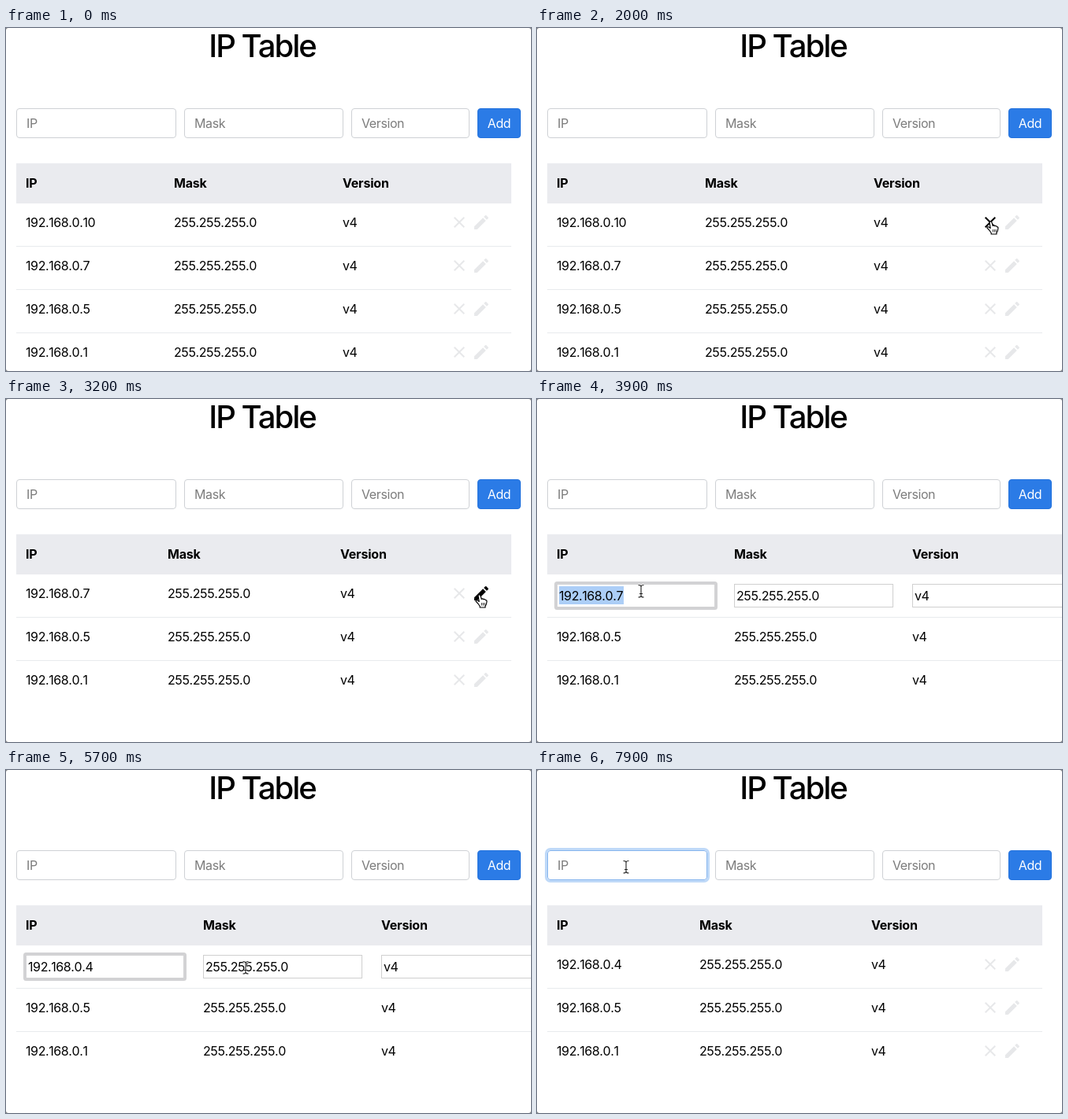
Animation, 666 px wide and 436 px high, one loop 8 s. Source, as an HTML page:

```html
<!DOCTYPE html>
<html lang="en">
<head>
<meta charset="utf-8">
<title>IP Table</title>
<style>
  html, body { margin: 0; width: 100%; height: 100%; overflow: hidden; background: #777; }
  svg { display: block; width: 666px; height: 436px; }
  text {
    font: 400 16px Inter, Roboto, sans-serif;
    font-optical-sizing: none;
    font-kerning: none;
    letter-spacing: -0.4px;
    fill: #000;
  }
  .title { font-size: 40px; font-weight: 500; font-kerning: normal; letter-spacing: -2px; text-anchor: middle; }
  .head { font-weight: 700; font-kerning: normal; letter-spacing: -0.2px; }
  .hint { fill: #7c7c7c; font-kerning: normal; }
  .add { fill: #fff; text-anchor: middle; }
</style>
</head>
<body>
<svg id="stage" viewBox="0 0 666 436" xmlns="http://www.w3.org/2000/svg"></svg>
<script>
const NS = 'http://www.w3.org/2000/svg';
const LOOP = 8000, STEP = 100;
const REMOVE = 2200, EDIT = 3300, FOCUS = 3700, SELECT = 3800;
const DESELECT = 4500, ERASE = 4800, TYPE = 5100, SAVE = 6100, FORM_FOCUS = 7000;
const PALE = '#e7e8ea', LINE = '#e8eaed';

const ICONS = {
  close: 'M19 6.41 17.59 5 12 10.59 6.41 5 5 6.41 10.59 12 5 17.59 6.41 19 12 13.41 17.59 19 19 17.59 13.41 12z',
  pencil: 'M3 17.25V21h3.75L17.81 9.94l-3.75-3.75zM20.71 7.04a1 1 0 0 0 0-1.41l-2.34-2.34a1 1 0 0 0-1.41 0l-1.83 1.83 3.75 3.75z'
};

// Pointer waypoints: time, x, y
const PATH = [
  [0, 622, 475], [300, 612, 446], [900, 577, 246], [2500, 577, 246],
  [2800, 598, 248], [3200, 602, 249], [3300, 602, 249], [3700, 132, 244],
  [5400, 132, 244], [5700, 304, 251], [6000, 304, 251], [6500, 138, 147],
  [7000, 113, 123], [8000, 113, 123]
];

const stage = document.getElementById('stage');

function add(parent, tag, attrs, content) {
  const node = document.createElementNS(NS, tag);
  for (const key in attrs) node.setAttribute(key, attrs[key]);
  if (content !== undefined) node.textContent = content;
  return parent.appendChild(node);
}
const group = parent => add(parent, 'g', {});
const text = (parent, x, y, content, cls = '') => add(parent, 'text', { x, y, class: cls }, content);
const rect = (parent, x, y, width, height, attrs) => add(parent, 'rect', { x, y, width, height, ...attrs });
const hline = (parent, y, width) => rect(parent, 13, y, width, 1, { fill: LINE });
const box = (parent, x, y, width, height, rx, stroke, fill = '#fff') =>
  rect(parent, x + .5, y + .5, width - 1, height - 1, { rx, stroke, fill });
const show = (node, on) => node.setAttribute('visibility', on ? 'inherit' : 'hidden');
const within = (t, from, to) => t >= from && t < to;
const blink = (t, since) => t >= since && (t - since) % 1000 < 500;

function header(parent, width, maskX, versionX) {
  rect(parent, 13, 172, width, 51, { fill: '#eaebef' });
  [[25, 'IP'], [maskX, 'Mask'], [versionX, 'Version']].forEach(([x, s]) => text(parent, x, 203, s, 'head'));
}

function cells(parent, i, ip, maskX, versionX) {
  const y = 253 + i * 55;
  [[25, ip], [maskX, '255.255.255.0'], [versionX, 'v4']].forEach(([x, s]) => text(parent, x, y, s));
}

function table(ips, maskX, versionX) {
  const g = group(stage);
  header(g, 628, maskX, versionX);
  g.icons = ips.map((ip, i) => {
    cells(g, i, ip, maskX, versionX);
    if (i < ips.length - 1) hline(g, 277 + i * 55, 628);
    const icon = (name, x) =>
      add(g, 'path', { d: ICONS[name], transform: `translate(${x} ${235 + i * 55})`, fill: PALE });
    return { close: icon('close', 563), pencil: icon('pencil', 591) };
  });
  return g;
}

rect(stage, 0, 0, 666, 436, { rx: 3, fill: '#fff' });
text(stage, 325, 37, 'IP Table', 'title');

const glow = rect(stage, 11.5, 100.5, 206, 41, { rx: 5.5, fill: 'none', stroke: '#bfd9f8', 'stroke-width': 3 });
const formBoxes = [[13, 203, 'IP'], [226, 202, 'Mask'], [438, 150, 'Version']].map(([x, w, hint]) => {
  const field = box(stage, x, 102, w, 38, 3.5, '#ced1d5');
  text(stage, x + 13, 127, hint, 'hint');
  return field;
});
box(stage, 598, 102, 55, 38, 3.5, '#2372dd', '#2b7be6');
text(stage, 625.5, 127, 'Add', 'add');
const formCaret = rect(stage, 26, 112, 1, 19, { fill: '#333' });

const tables = [
  table(['192.168.0.10', '192.168.0.7', '192.168.0.5', '192.168.0.1'], 213, 427),
  table(['192.168.0.7', '192.168.0.5', '192.168.0.1'], 205, 424),
  table(['192.168.0.4', '192.168.0.5', '192.168.0.1'], 206, 424)
];

const editor = group(stage);
header(editor, 653, 250, 476);
hline(editor, 277, 653);
hline(editor, 332, 653);
cells(editor, 1, '192.168.0.5', 250, 476);
cells(editor, 2, '192.168.0.1', 250, 476);
[25, 250, 476].forEach(x => box(editor, x, 235, 202, 30, 0, '#cfcfcf'));
const ring = rect(editor, 24, 234, 203, 32, { rx: 1.5, fill: '#fff', stroke: '#d2d2d4', 'stroke-width': 4 });
const selection = rect(editor, 28, 238, 82, 23, { fill: '#accef7' });
const ipValue = text(editor, 28, 256, '');
text(editor, 253, 256, '255.255.255.0');
text(editor, 479, 256, 'v4');
const editCaret = rect(editor, 28, 241, 1, 18, { fill: '#000' });

const pointer = group(stage);
const shapes = { arrow: group(pointer), hand: group(pointer), beam: group(pointer) };
add(shapes.arrow, 'path', {
  d: 'M0 0V13.5L3 10.8 5.4 16.2 7.8 15.1 5.5 9.9H9.6Z',
  fill: '#000', stroke: '#fff', 'stroke-width': 1.2, 'paint-order': 'stroke'
});
add(shapes.hand, 'path', {
  d: 'M-3 1Q-2.6-.6-1.1-.2L0 1.2 1.3 5.5Q2.8 4.2 3.8 5.8 5.4 4.8 6.2 6.6 8 6.4 8 8.5L7.3 12 6 14.2V16H-.8V14.5L-3.2 11-6 8.2Q-6 6.4-4.2 6.8L-1.8 8.4Z',
  fill: '#fff', stroke: '#000', 'stroke-width': 1.2, 'stroke-linejoin': 'round'
});
add(shapes.hand, 'path', { d: 'M1.4 10v3.5M3.4 10v3.5M5.3 10v3.5', stroke: '#000', 'stroke-width': .8 });
[['#fff', 2.6], ['#222', 1.1]].forEach(([stroke, width]) => add(shapes.beam, 'path', {
  d: 'M-3.5-7.5Q0-7.5 0-5.5 0-7.5 3.5-7.5M0-6V6.5M-3.5 8Q0 8 0 6 0 8 3.5 8M-2 3.5H2',
  fill: 'none', stroke, 'stroke-width': width
}));

function pointerAt(t) {
  const i = Math.max(1, PATH.findIndex(p => p[0] >= t));
  const [t0, x0, y0] = PATH[i - 1], [t1, x1, y1] = PATH[i];
  const u = (t - t0) / (t1 - t0);
  const k = u * u * (3 - 2 * u);
  return [x0 + (x1 - x0) * k, y0 + (y1 - y0) * k];
}

function shapeAt(t) {
  if (within(t, 1100, 3400)) return 'hand';
  if (within(t, 3600, SAVE) || t >= FORM_FOCUS) return 'beam';
  return 'arrow';
}

function render(t) {
  const editing = within(t, EDIT, SAVE);
  const current = t < REMOVE ? 0 : t < SAVE ? 1 : 2;
  tables.forEach((g, i) => {
    show(g, !editing && i === current);
    g.icons[0].close.setAttribute('fill', within(t, 1100, 2900) ? '#000' : PALE);
    g.icons[0].pencil.setAttribute('fill', within(t, 2900, EDIT) ? '#000' : PALE);
  });

  show(editor, editing);
  show(ring, t >= FOCUS);
  show(selection, within(t, SELECT, DESELECT));
  ipValue.textContent = '192.168.0.' + (t < ERASE ? '7' : t < TYPE ? '' : '4');
  const lastInput = [FOCUS, DESELECT, ERASE, TYPE].filter(k => k <= t).pop();
  const caretOn = editing && t >= FOCUS && !within(t, SELECT, DESELECT) && blink(t, lastInput);
  show(editCaret, caretOn);
  if (caretOn) editCaret.setAttribute('x', 28 + Math.round(ipValue.getComputedTextLength()));

  const formFocused = t >= FORM_FOCUS;
  show(glow, formFocused);
  formBoxes[0].setAttribute('stroke', formFocused ? '#86b5ee' : '#ced1d5');
  show(formCaret, formFocused && blink(t, FORM_FOCUS));

  const [x, y] = pointerAt(t);
  pointer.setAttribute('transform', `translate(${Math.round(x)} ${Math.round(y)})`);
  show(pointer, !within(t, ERASE, 5500));
  const shape = shapeAt(t);
  for (const name in shapes) show(shapes[name], name === shape);
}

const start = performance.now();
function tick() {
  const elapsed = (performance.now() - start) % LOOP;
  render(Math.floor(elapsed / STEP) * STEP);
  requestAnimationFrame(tick);
}
tick();
</script>
</body>
</html>
```
